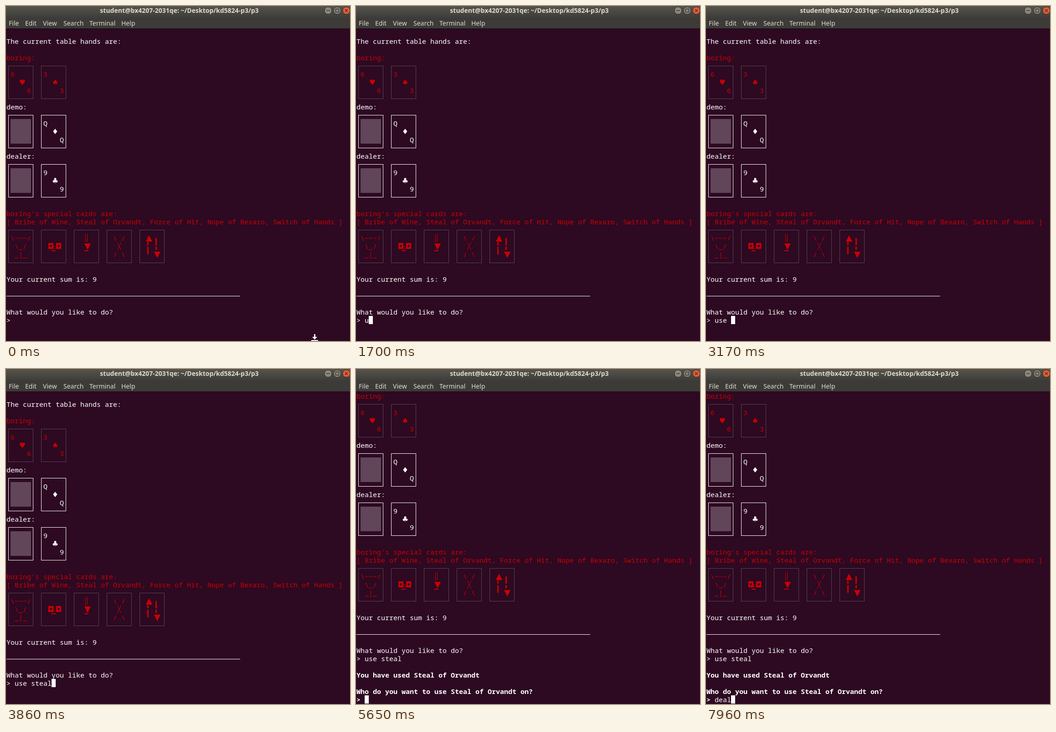
Animation of 755x735 px, one loop 8000 ms. Source, as an HTML page with a canvas:

```html
<!DOCTYPE html>
<html lang="en">
<head>
<meta charset="utf-8">
<title>Card game in a terminal</title>
<style>
  html, body { margin: 0; width: 100%; height: 100%; overflow: hidden; background: #2d0922; }
  canvas { display: block; width: 755px; height: 735px; }
</style>
</head>
<body>
<canvas id="stage" width="755" height="735"></canvas>
<script>
const g = document.getElementById('stage').getContext('2d');
const LOOP = 8000, CELL = 9, ROW = 18, LEFT = 1, TOP = 50;
const BG = '#2d0922', RED = '#cc0000', WHITE = '#ffffff', DIM = '#564650', BACK = '#614659';
const MONO = '"Noto Sans Mono", "DejaVu Sans Mono", monospace';
const UI = '"Noto Sans", "Open Sans", sans-serif';
const FRIEND = 'Orvandt', RIVAL = 'Bexaro';

const colX = c => LEFT + c * CELL;
const rowY = r => TOP + r * ROW;

// [time, typed text, cursor visible]
const FIRST = [
  [0, '', 0], [680, '', 1], [1230, '', 0], [1550, '', 1], [1700, 'u', 1],
  [1780, 'us', 1], [1930, 'use', 1], [2160, 'use ', 1], [2790, 'use ', 0],
  [3170, 'use ', 1], [3400, 'use s', 1], [3550, 'use st', 1], [3630, 'use ste', 1],
  [3710, 'use stea', 1], [3860, 'use steal', 1], [4490, 'use steal', 0], [5020, 'use steal', 1]
];
const ENTER = 5650;
const SECOND = [
  [ENTER, '', 1], [6110, '', 0], [6720, '', 1], [7350, '', 0], [7500, '', 1],
  [7580, 'd', 1], [7660, 'de', 1], [7810, 'dea', 1], [7960, 'deal', 1]
];

// [time, x, y, shape]
const POINTER = [
  [0, 677.5, 735, 'edge'], [70, 690, 735, 'edge'], [140, 712, 721, 'beam'],
  [300, 717, 712, 'beam'], [360, 711, 718, 'beam'], [410, 700, 735, 'edge'], [470, 0, 0, '']
];

const at = (steps, t) => steps.filter(s => s[0] <= t).pop();

function rect(x, y, w, h, color) {
  g.fillStyle = color;
  g.fillRect(x, y, w, h);
}

function poly(color, ...pts) {
  g.fillStyle = color;
  g.beginPath();
  pts.forEach(([x, y]) => g.lineTo(x, y));
  g.fill();
}

function text(row, col, str, color = WHITE, weight = 400) {
  g.font = `${weight} 15px ${MONO}`;
  g.textAlign = 'left';
  g.fillStyle = color;
  g.fillText(str, colX(col), rowY(row) + 15);
}

function frame(row, col, color) {
  g.strokeStyle = color;
  g.lineWidth = 1;
  g.strokeRect(colX(col) + 4.5, rowY(row) + 9.5, 6 * CELL, 4 * ROW);
}

function card(row, col, rank, suit, color, border) {
  frame(row, col, border);
  text(row + 1, col + 1, rank, color);
  text(row + 3, col + 5, rank, color);
  g.font = '16px "DejaVu Sans", sans-serif';
  g.textAlign = 'center';
  g.fillText(suit, colX(col) + 35, rowY(row + 2) + 15);
}

function faceDown(row, col) {
  frame(row, col, WHITE);
  rect(colX(col + 1), rowY(row + 1), 5 * CELL, 3 * ROW, BACK);
}

function triangle(x, y, dir) {
  poly(RED, [x - 7, y - 7 * dir], [x + 7, y - 7 * dir], [x, y + 7 * dir]);
}

function wine(row) {
  ['\\~~~/', ' \\_/', ' _|_'].forEach((s, i) => text(row + i, 1, s, RED));
}

function thief(row) {
  const y = rowY(row + 1);
  for (const x of [93, 110]) {
    rect(x, y + 2, 11, 13, RED);
    g.fillStyle = BG;
    g.beginPath();
    g.arc(x + 5.5, y + 8.5, 2.5, 0, 7);
    g.fill();
  }
  rect(100, y + 9, 9, 1, RED);
  rect(100, y + 13, 9, 1, RED);
  rect(100, y + 18, 9, 2, RED);
}

function force(row) {
  const y = rowY(row);
  rect(174, y, 1, ROW, RED);
  rect(178, y, 1, ROW, RED);
  triangle(179, y + 28, 1);
  rect(172, y + 36, 9, 2, RED);
}

function nope(row) {
  const y = rowY(row + 1);
  text(row, 26, '\\ /', RED);
  text(row + 2, 26, '/ \\', RED);
  g.strokeStyle = RED;
  g.beginPath();
  g.moveTo(244, y);
  g.lineTo(253, y + ROW);
  g.moveTo(253, y);
  g.lineTo(244, y + ROW);
  g.stroke();
}

function swap(row) {
  const y = rowY(row);
  triangle(314, y + 10, -1);
  rect(310, y + 18, 3, 7, RED);
  rect(310, y + 28, 3, 17, RED);
  rect(328, y + 9, 3, 16, RED);
  rect(328, y + 28, 3, 7, RED);
  triangle(332, y + 46, 1);
}

function table() {
  text(1, 0, 'The current table hands are:');
  text(3, 0, 'boring:', RED);
  card(4, 0, '6', '♥', RED, DIM);
  card(4, 8, '3', '♠', RED, DIM);
  text(9, 0, 'demo:');
  faceDown(10, 0);
  card(10, 8, 'Q', '♦', WHITE, WHITE);
  text(15, 0, 'dealer:');
  faceDown(16, 0);
  card(16, 8, '9', '♣', WHITE, WHITE);

  text(22, 0, "boring's special cards are:", RED);
  text(23, 0, `[ Bribe of Wine, Steal of ${FRIEND}, Force of Hit, Nope of ${RIVAL}, Switch of Hands ]`, RED);
  for (let i = 0; i < 5; i++) frame(24, i * 8, DIM);
  [wine, thief, force, nope, swap].forEach(draw => draw(25));

  text(30, 0, 'Your current sum is: 9');
  rect(LEFT, rowY(32) + 10, 57 * CELL, 1, WHITE);
  text(34, 0, 'What would you like to do?');
}

function prompt(row, typed, cursor, weight) {
  text(row, 0, '>', WHITE, weight);
  text(row, 2, typed);
  if (cursor) rect(colX(2 + typed.length), rowY(row), CELL, ROW, WHITE);
}

function button(x, color, glyph) {
  g.fillStyle = color;
  g.strokeStyle = '#2f2e2a';
  g.lineWidth = 1;
  g.beginPath();
  g.arc(x, 10, 8, 0, 7);
  g.fill();
  g.stroke();
  g.strokeStyle = '#383630';
  g.lineWidth = 1.4;
  g.stroke(new Path2D(glyph));
}

function header() {
  const shade = g.createLinearGradient(0, 0, 0, 26);
  shade.addColorStop(0, '#56544d');
  shade.addColorStop(1, '#3d3c38');
  rect(0, 0, 755, 49, '#3c3b37');
  rect(0, 0, 755, 26, shade);

  g.fillStyle = '#dfdbd2';
  g.font = `700 14px ${UI}`;
  g.textAlign = 'center';
  g.fillText('student@bx4207-2031qe: ~/Desktop/kd5824-p3/p3', 380.5, 15);

  g.font = `400 14px ${UI}`;
  g.textAlign = 'left';
  const menu = { File: 6, Edit: 42, View: 81, Search: 126, Terminal: 183, Help: 253 };
  for (const name in menu) g.fillText(name, menu[name], 43);

  button(707, '#8b887e', 'M703 10h8');
  button(727, '#8b887e', 'M723.5 6.5h7v7h-7z');
  button(747, '#ea5b34', 'M744 7l6 6M750 7l-6 6');
}

function pointer(x, y, shape) {
  if (shape === 'edge') {
    rect(x - 7.5, y - 2, 15, 2, WHITE);
    rect(x - 1.5, y - 15, 3, 8, WHITE);
    poly(WHITE, [x - 5.5, y - 9], [x + 5.5, y - 9], [x, y - 3]);
  } else if (shape === 'beam') {
    rect(x - 1, y - 8, 2, 16, WHITE);
    rect(x - 4, y - 8, 8, 1, WHITE);
    rect(x - 4, y + 7, 8, 1, WHITE);
  }
}

function draw(now) {
  const t = now % LOOP;
  const entered = t >= ENTER;
  rect(0, 0, 755, 735, BG);

  g.save();
  if (entered) g.translate(0, -3 * ROW);
  table();
  const [, typed, cursor] = at(FIRST, t);
  prompt(35, typed, cursor && !entered, 400);
  g.restore();

  if (entered) {
    const [, reply, on] = at(SECOND, t);
    text(34, 0, `You have used Steal of ${FRIEND}`, WHITE, 700);
    text(36, 0, `Who do you want to use Steal of ${FRIEND} on?`, WHITE, 700);
    prompt(37, reply, on, 700);
  }

  header();
  pointer(...at(POINTER, t).slice(1));
}

const start = performance.now();
function tick() {
  draw(performance.now() - start);
  requestAnimationFrame(tick);
}
tick();
</script>
</body>
</html>
```
